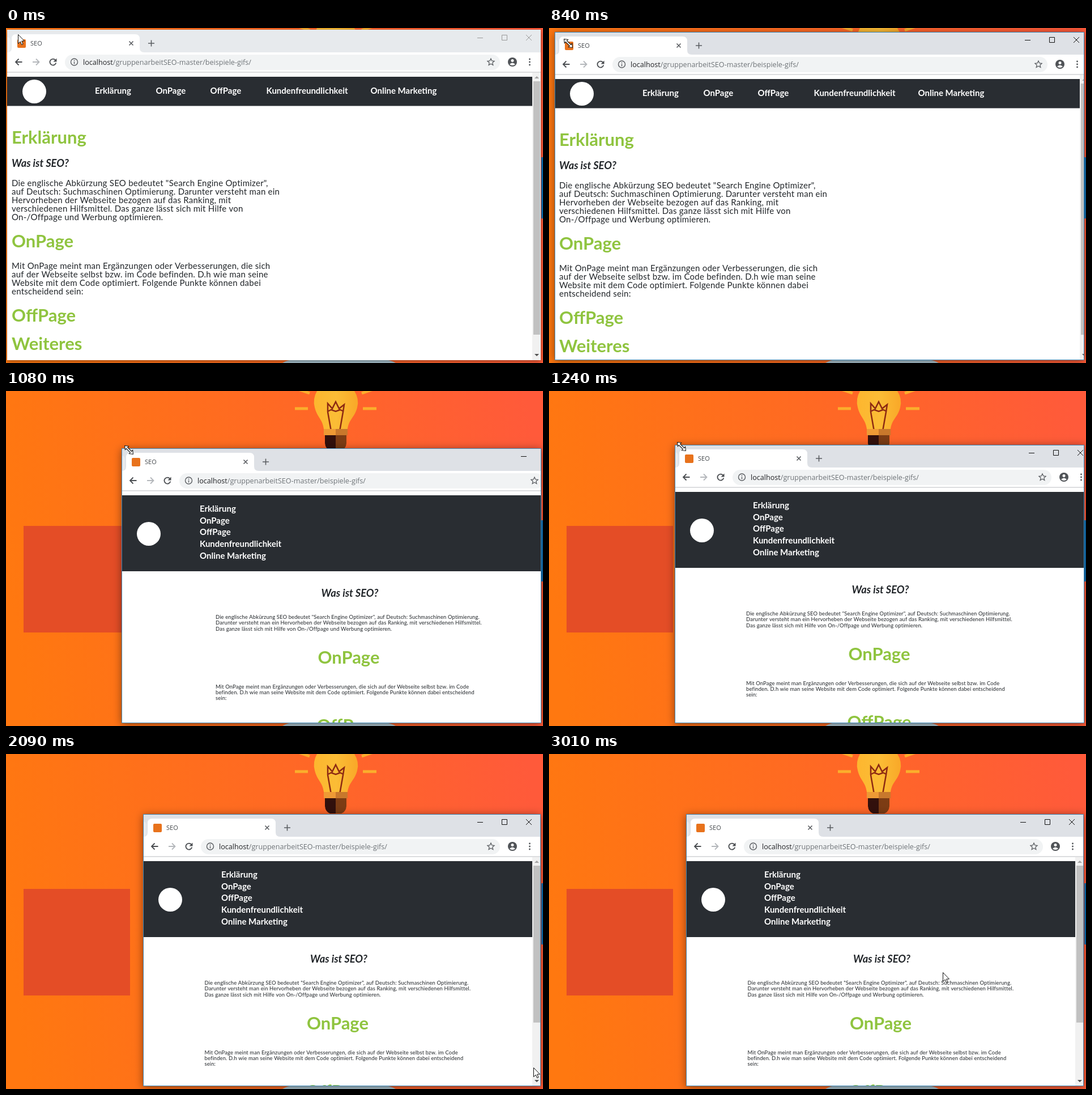
An HTML page with a canvas for the animation above (3.94 s loop, 948 by 591 pixels).

```html
<!DOCTYPE html>
<html lang="de">
<head>
<meta charset="utf-8">
<title>Responsive Seite</title>
<style>
  html, body { margin: 0; width: 100%; height: 100%; overflow: hidden; }
  canvas { display: block; }
</style>
</head>
<body>
<canvas id="stage" width="948" height="591"></canvas>
<script>
const ctx = document.getElementById('stage').getContext('2d');
const LOOP = 3940, BOTTOM = 586;
const GREEN = '#8fc43f', INK = '#212529', ICON = '#5a5d61';
const PAGE_FONT = 'Lato, sans-serif', UI_FONT = '"Open Sans", sans-serif';

// time, left, top, right, right edge of the (lagging) layout
const windowSteps = [
  [0, 2, 3, 944, 944], [650, 3, 3, 945, 945], [780, 10, 7, 945, 952],
  [855, 33, 22, 945, 968], [930, 74, 47, 945, 986], [1010, 128, 74, 945, 999],
  [1080, 204, 101, 945, 1021], [1170, 208, 98, 945, 949], [1240, 222, 95, 945, 959],
  [1320, 234, 93, 945, 957], [1400, 240, 92, 945, 945], [1560, 240, 104, 945, 945],
  [1620, 242, 106, 944, 944]
];
// time, x, y, shape
const cursorSteps = [
  [0, 21, 11, arrow], [70, 19, 9, arrow], [140, 15, 7, arrow], [210, 10, 5, arrow],
  [280, 6, 4, arrow], [350, 8, 9, resize], [420, 10.5, 12, resize],
  [780, 34, 27, resize], [855, 85, 57, resize], [930, 136, 87, resize],
  [1010, 190, 103, resize], [1080, 217, 104, resize], [1170, 223, 100, resize],
  [1240, 234, 98, resize], [1320, 242, 96, resize], [1400, 245, 96, resize],
  [1560, 245, 108, resize], [1850, 532, 350, arrow], [1950, 0, 0, null],
  [2090, 931, 553, arrow], [2160, 887, 576, arrow], [2240, 0, 0, null],
  [2480, 858, 574, arrow], [2560, 812, 510, arrow], [2640, 762, 452, arrow],
  [2710, 724, 412, arrow], [2780, 702, 391, arrow], [2860, 696, 385, arrow],
  [3010, 695, 385, arrow]
];
const navItems = ['Erklärung', 'OnPage', 'OffPage', 'Kundenfreundlichkeit', 'Online Marketing'];
const navX = [155, 262.5, 358.5, 457.5, 641.5];
const wideIntro = [
  'Die englische Abkürzung SEO bedeutet "Search Engine Optimizer",',
  'auf Deutsch: Suchmaschinen Optimierung. Darunter versteht man ein',
  'Hervorheben der Webseite bezogen auf das Ranking, mit',
  'verschiedenen Hilfsmittel. Das ganze lässt sich mit Hilfe von',
  'On-/Offpage und Werbung optimieren.'
];
const wideOnPage = [
  'Mit OnPage meint man Ergänzungen oder Verbesserungen, die sich',
  'auf der Webseite selbst bzw. im Code befinden. D.h wie man seine',
  'Website mit dem Code optimiert. Folgende Punkte können dabei',
  'entscheidend sein:'
];
const narrowIntro = [
  'Die englische Abkürzung SEO bedeutet "Search Engine Optimizer", auf Deutsch: Suchmaschinen Optimierung.',
  'Darunter versteht man ein Hervorheben der Webseite bezogen auf das Ranking, mit verschiedenen Hilfsmittel.',
  'Das ganze lässt sich mit Hilfe von On-/Offpage und Werbung optimieren.'
];
const narrowOnPage = [
  'Mit OnPage meint man Ergänzungen oder Verbesserungen, die sich auf der Webseite selbst bzw. im Code',
  'befinden. D.h wie man seine Website mit dem Code optimiert. Folgende Punkte können dabei entscheidend',
  'sein:'
];

const stepAt = (steps, t) => steps.findLast(step => step[0] <= t);

function rect(x, y, w, h, color, radius = 0) {
  ctx.fillStyle = color;
  ctx.beginPath();
  ctx.roundRect(x, y, w, h, radius);
  ctx.fill();
}
function disc(x, y, r, color) {
  ctx.fillStyle = color;
  ctx.beginPath();
  ctx.arc(x, y, r, 0, 7);
  ctx.fill();
}
function shape(path, fill, stroke, width = 1) {
  const p = new Path2D(path);
  if (fill) { ctx.fillStyle = fill; ctx.fill(p); }
  if (stroke) { ctx.strokeStyle = stroke; ctx.lineWidth = width; ctx.stroke(p); }
}
function at(x, y, draw, angle = 0) {
  ctx.save();
  ctx.translate(x, y);
  ctx.rotate(angle);
  draw();
  ctx.restore();
}
function text(str, x, y, font, color, align = 'left', spacing = 0) {
  ctx.font = font;
  ctx.fillStyle = color;
  ctx.textAlign = align;
  ctx.letterSpacing = spacing + 'px';
  ctx.fillText(str, x, y);
}
function lines(list, x, y, size, leading, spacing) {
  list.forEach((line, i) => text(line, x, y + i * leading, `${size}px ${PAGE_FONT}`, INK, 'left', spacing));
}
const heading = (str, x, y, align) => text(str, x, y, `bold 31px ${PAGE_FONT}`, GREEN, align);
const subheading = (x, y, align) => text('Was ist SEO?', x, y, `italic bold 18.3px ${PAGE_FONT}`, INK, align);

function arrow() {
  shape('M.5 .5V16.5L4.2 13 6.6 18.5 9 17.5 6.7 12H11.5Z', '#fff', '#111');
}
function resize() {
  ctx.rotate(Math.PI / 4);
  shape('M-10.5 0L-5 -4.5V-1.5H5V-4.5L10.5 0 5 4.5V1.5H-5V4.5Z', '#fff', '#111');
}

function drawWallpaper() {
  const sky = ctx.createLinearGradient(0, 330, 948, 200);
  sky.addColorStop(0, '#ff7810');
  sky.addColorStop(0.5, '#ff6a22');
  sky.addColorStop(1, '#ff5a3a');
  rect(0, 0, 948, 591, sky);
  rect(31, 238, 188, 188, '#e44d26');
  rect(945, 228, 3, 108, '#1172b6');
  drawBulb();
  shape('M488 591Q496 586 506 585H668Q680 586 688 591Z', '#a9c3cf');
}
function drawBulb() {
  const glass = ctx.createLinearGradient(544, 0, 621, 0);
  glass.addColorStop(0, '#fdb62f');
  glass.addColorStop(0.5, '#fbbd36');
  glass.addColorStop(1, '#f9a828');
  shape('M549 0Q541 14 545 29C549 46 559 50 561 67H603C605 50 616 46 620 29Q624 14 615 0Z', glass);
  ctx.lineCap = 'butt';
  shape('M510 31H533M630 31H654M516 -3L536 4M648 -3L628 4', null, '#fbae2c', 5);
  shape('M574 71L568 37V22L576 31 582 19 588 31 597 24 595 37 589 71M568 36L574 33 582 36 590 33 596 36',
    null, '#8d2a12', 2.5);
  rect(561, 67, 21, 11, '#ee9a35');
  rect(582, 67, 21, 11, '#c8782c');
  shape('M563 78H582V105H572Q564 102 563 92Z', '#32100c');
  shape('M582 78H601V92Q600 102 592 105H582Z', '#7c3c14');
}

function drawTabStrip(right, active) {
  rect(0, 0, right, 40, active ? '#dee1e6' : '#e7eaed');
  rect(0, 13, 6, 27, active ? '#e8eaed' : '#f0f2f4', [0, 6, 6, 0]);
  shape('M0 40Q8 40 8 32V16Q8 8 16 8H226Q234 8 234 16V32Q234 40 242 40Z', '#fff');
  rect(18, 17, 15, 15, '#e8721c', 2);
  text('SEO', 41, 28, `11px ${UI_FONT}`, '#45494d');
  shape('M215.5 20.5L222.5 27.5M222.5 20.5L215.5 27.5M249 24H260M254.5 18.5V29.5', null, ICON, 1.6);

  const tone = active ? '#111' : '#999';
  at(right, 14, () => shape(
    'M-112 .5H-102M-68.5 -4.5H-59.5V4.5H-68.5ZM-26 -5L-16 5M-16 -5L-26 5', null, tone));
}
function drawToolbar(right) {
  rect(0, 40, right, 35, '#fff');
  rect(0, 74.5, right, 1, '#b9bcc0');
  const back = 'M6 0H-5.5M0 -5.5L-5.5 0 0 5.5';
  at(20.5, 57, () => shape(back, null, '#4a4d51', 1.8));
  at(51, 57, () => shape(back, null, '#b4b7bb', 1.8), Math.PI);
  at(81, 57, () => {
    shape('M4.2 -3.5A5.5 5.5 0 1 0 5.3 1.5', null, '#4a4d51', 1.8);
    shape('M6.5 -6.5V-.5H.5Z', '#4a4d51');
  });
  rect(102, 44, right - 174, 27, '#f1f3f4', 13.5);
  at(118.5, 57, () => shape('M6 0A6 6 0 1 1 -6 0A6 6 0 1 1 6 0M0 -3.5V-1.8M0 -.5V3.5', null, ICON, 1.4));

  const host = 'localhost', font = `12.6px ${UI_FONT}`;
  text(host, 134, 62, font, '#202124');
  text('/gruppenarbeitSEO-master/beispiele-gifs/', 134 + ctx.measureText(host).width, 62, font, '#6f7478');

  at(right - 88, 57, () => shape(
    'M0 -6L1.8 -2 6 -1.6 2.8 1.3 3.8 5.5 0 3.3 -3.8 5.5 -2.8 1.3 -6 -1.6 -1.8 -2Z', null, ICON, 1.3));
  at(right - 50, 57, () => {
    disc(0, 0, 8, '#505357');
    disc(0, -2.5, 2.5, '#fff');
    shape('M-5 4Q0 -1 5 4Q0 8 -5 4Z', '#fff');
  });
  [-5, 0, 5].forEach(dy => disc(right - 19.5, 57 + dy, 1.4, '#505357'));
}
function drawScrollbar(right, height, wide) {
  const track = height - 107;
  rect(right - 15, 76, 15, height, '#f1f1f1');
  rect(right - 13, 91, 12, track * (wide ? 0.939 : 0.742), '#c1c1c1');
  at(right - 7, 84, () => shape('M-4 2L0 -2 4 2Z', '#a3a3a3'));
  at(right - 7, height - 9, () => shape('M-4 -2L0 2 4 -2Z', '#505050'));
}
function drawWidePage() {
  navItems.forEach((item, i) => text(item, navX[i], 113, `bold 15px ${PAGE_FONT}`, '#fff'));
  heading('Erklärung', 8, 201);
  subheading(8, 242);
  lines(wideIntro, 8, 276, 15, 15.1, 0.25);
  heading('OnPage', 8, 384);
  lines(wideOnPage, 8, 421.5, 15, 15.1, 0.25);
  heading('OffPage', 8, 515);
  heading('Weiteres', 8, 565);
}
function drawNarrowPage(center) {
  navItems.forEach((item, i) => text(item, 138, 112 + i * 20.7, `bold 15px ${PAGE_FONT}`, '#fff'));
  subheading(center + 2, 262, 'center');
  lines(narrowIntro, center - 235, 301, 9.4, 10.4, 0.15);
  heading('OnPage', center, 380, 'center');
  lines(narrowOnPage, center - 235, 423.5, 9.4, 10.4, 0.15);
  heading('OffPage', center, 500, 'center');
}
function drawBrowser([, left, top, edge, layoutEdge], active) {
  const width = edge - left, height = BOTTOM - top, right = layoutEdge - left;
  const wide = right > 850;
  ctx.save();
  ctx.translate(left, top);
  ctx.shadowColor = 'rgba(0,0,0,.45)';
  ctx.shadowBlur = active ? 14 : 8;
  ctx.shadowOffsetY = 2;
  rect(0, 0, width, height, '#fff');
  ctx.shadowColor = 'transparent';

  ctx.save();
  ctx.beginPath();
  ctx.rect(0, 0, width, height);
  ctx.clip();
  drawTabStrip(right, active);
  drawToolbar(right);
  rect(0, 83, right - 15, wide ? 51.5 : 134, '#292d32');
  disc(48, wide ? 109 : 151, 21, '#fff');
  if (wide) drawWidePage();
  else drawNarrowPage((right - 15) / 2);
  drawScrollbar(right, height, wide);
  ctx.restore();

  if (active) {
    ctx.strokeStyle = '#3f87b5';
    ctx.lineWidth = 1;
    ctx.strokeRect(0.5, 0.5, width - 1, height - 1);
  }
  ctx.restore();
}

function render(now) {
  const t = now % LOOP;
  drawWallpaper();
  drawBrowser(stepAt(windowSteps, t), t >= 650);
  const [, x, y, cursor] = stepAt(cursorSteps, t);
  if (cursor) at(x, y, cursor);
}

const start = performance.now();
function tick() {
  render(performance.now() - start);
  requestAnimationFrame(tick);
}
tick();
</script>
</body>
</html>
```
